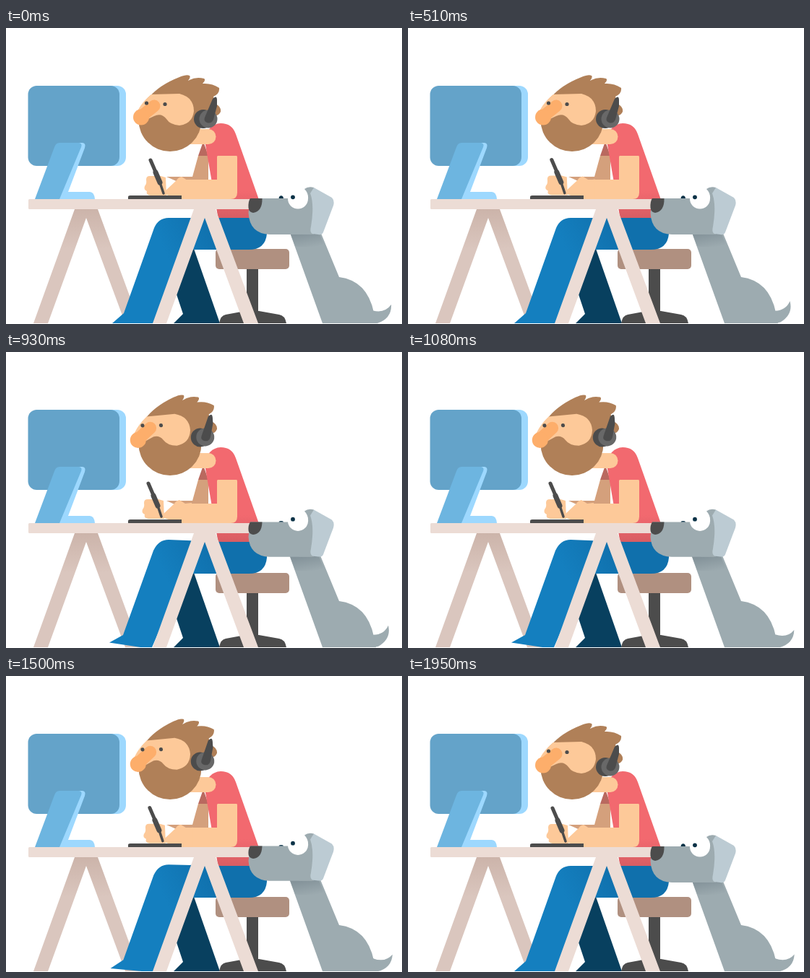
An HTML page for the animation above (1.98 s loop, 548 px wide and 410 px high).

```html
<!DOCTYPE html>
<html lang="en">
<head>
<meta charset="utf-8">
<title>At the desk</title>
<style>
  html, body { margin: 0; width: 100%; height: 100%; overflow: hidden; background: #fff; }
  svg { display: block; width: 548px; height: 410px; }
  .brown { fill: #b08058; } .skin { fill: #fdc999; } .dark { fill: #4c4c4c; }
  .wood { fill: #ecdcd5; } .glow { fill: #9dd8fe; } .navy { fill: #0b3247; }
  .dog { fill: #9dabb0; }
</style>
</head>
<body>
<svg viewBox="0 0 548 410">
  <defs>
    <linearGradient id="backWood" x1="0" y1="0" x2="0" y2="1">
      <stop offset="0" stop-color="#ccb4aa"/><stop offset=".35" stop-color="#dac6be"/>
    </linearGradient>
    <linearGradient id="jeans" gradientUnits="userSpaceOnUse" x1="215" y1="300" x2="285" y2="265">
      <stop offset="0" stop-color="#147fbf"/><stop offset="1" stop-color="#1070ac"/>
    </linearGradient>
    <linearGradient id="shirt" x1="0" y1="0" x2="0" y2="1">
      <stop offset=".7" stop-color="#f2696f"/><stop offset="1" stop-color="#d65c62"/>
    </linearGradient>
    <linearGradient id="neckShade" gradientUnits="userSpaceOnUse" x1="408" y1="284" x2="412" y2="306">
      <stop offset="0" stop-color="#84939a"/><stop offset="1" stop-color="#9dabb0"/>
    </linearGradient>
  </defs>

  <!-- far trestle, far leg, stool -->
  <path fill="url(#backWood)" d="M95 251H127L185 409H165L111 263L58 409H38Z"/>
  <path fill="#08405f" d="M232 409L245 396L228 345L258 300L296 409Z"/>
  <rect class="dark" x="333" y="330" width="16" height="66"/>
  <path class="dark" d="M295 409Q297 398 304 397L331 392H350L378 397Q386 398 388 409Z"/>
  <rect x="290" y="306" width="102" height="28" rx="5" fill="#b09080"/>

  <!-- body -->
  <path fill="#d4a07c" d="M266 177H280V214H240L222 206H258Z"/>
  <path fill="#b9695f" d="M273 157L266 177H280Z"/>
  <path fill="url(#shirt)" d="M275 156Q279 133 297 132Q313 132 318 147L360 266H294Z"/>
  <path class="skin" d="M255 140H280A10.5 10.5 0 0 1 280 161H255Z"/>
  <path id="leg" fill="url(#jeans)"/>

  <!-- arm, hands, pen -->
  <path class="skin" d="M293 177H319Q320 177 320 179V228Q320 237 311 237H240V210H292V178Z"/>
  <g id="hand">
    <path class="skin" d="M194 210Q194 205 199 205H214L221 207L222 232H200Q193 231 195 226Q190 224 192 219Q195 216 194 210Z"/>
    <path class="skin" d="M251 211L243 206Q238 207 236 211L220 226Q217 229 222 231L240 237H260V210Z"/>
    <g fill="none" stroke="#4c4c4c" stroke-linecap="round" stroke-linejoin="round">
      <path stroke-width="5" d="M200 183L206 197"/>
      <path stroke-width="7" d="M207 200L213 214"/>
      <path stroke-width="3.5" d="M213 214L218 229"/>
    </g>
  </g>
  <path class="dark" d="M169 237V234Q169 232 172 232H243V237Z"/>

  <!-- table -->
  <path class="wood" d="M260 251H290L349 409H329L275 263L222 409H203Z"/>
  <rect class="wood" x="31" y="237" width="311" height="14" rx="1.5"/>

  <!-- monitor -->
  <rect class="glow" x="60" y="80" width="106" height="111" rx="12"/>
  <rect x="30.500" y="80" width="126.500" height="111" rx="12" fill="#64a3c9"/>
  <path class="glow" d="M95 159H106Q111 160 109 166L86 227H116Q122 227 123 237H60Z"/>
  <path fill="#6db5e0" d="M74 159H101Q106 160 104 165L74 237H40L67 165Q69 159 74 159Z"/>

  <!-- head -->
  <circle class="brown" cx="227" cy="127.500" r="43.500"/>
  <g id="head">
    <path class="brown" d="M198 96Q212 79 240 68Q250 64 254 66Q256 68 252 73Q262 67 274 70Q277 72 272 77Q285 76 295 83Q296 91 287 95L290 105Q298 109 297 116Q294 123 286 121L268 140L200 112Z"/>
    <path class="skin" d="M201 92L240 91Q260 96 260 115Q258 133 240 135Q227 134 222 126Q215 117 205 122L184 132L183 113Q189 102 201 92Z"/>
    <path fill="none" stroke="#fdae6b" stroke-width="17" stroke-linecap="round" d="M205 108L189 121"/>
    <circle cx="187" cy="123.500" r="11" fill="#fdae6b"/>
    <circle class="dark" cx="194.500" cy="104" r="2.600"/>
    <circle class="dark" cx="220" cy="105.500" r="2.600"/>
    <circle class="dark" cx="273" cy="126" r="13"/>
    <circle cx="280" cy="126" r="12.500" fill="#686868"/>
    <path class="dark" d="M275 124L286 98Q292 92 292 100V108L287 127Q284 133 278 131Q273 129 275 124Z"/>
  </g>

  <!-- dog -->
  <path class="dog" id="tail" d="M500 409L506 391Q524 396 533 383Q534 402 514 409Z"/>
  <path class="dog" d="M388 270H430L461 345Q500 350 509 394L512 409H438Z"/>
  <path fill="url(#neckShade)" d="M393 283H433L440 300Q415 306 400 302Z"/>
  <path class="dog" id="snout"/>
  <path class="navy" id="farEye"/>
  <g id="dogHead">
    <path class="dog" d="M405 238H418Q419 229 413 223Q418 219 426 221V286H405Z"/>
    <circle cx="404" cy="236.500" r="14" fill="#fff"/>
    <circle class="navy" cx="397" cy="234.300" r="2.900"/>
    <path fill="#bccbd3" d="M426 221L451 235Q455 239 453 246L439 283Q437 287 432 286L424 285Q420 283 422 275Q427 245 421 229Z"/>
  </g>
  <path class="dark" id="nose"/>
  <rect y="409" width="548" height="1" fill="#fff"/>
</svg>
<script>
  const LOOP = 1980;
  const el = id => document.getElementById(id);
  const set = (id, name, value) => el(id).setAttribute(name, value);
  const ease = (t, from, to) => {
    const x = Math.min(1, Math.max(0, (t - from) / (to - from)));
    return x * x * (3 - 2 * x);
  };
  // Rises to 1 between a and b, falls back to 0 between c and d.
  const hold = (t, a, b, c, d) => ease(t, a, b) - ease(t, c, d);

  function draw(t) {
    const look = hold(t, 690, 920, 1700, 1940);
    const tap = hold(t, 690, 910, 1400, 1640);
    const write = hold(t, 400, 660, 1300, 1640);
    const wag = 9 * Math.cos((t - 1939) / 220 * 2 * Math.PI) - 3;

    set('head', 'transform', `rotate(${-4 * look} 162 183)`);
    set('hand', 'transform', `translate(${-3 * write} ${-write})`);
    set('tail', 'transform', `rotate(${wag} 508 402)`);
    set('dogHead', 'transform', `translate(0 ${-2.6 * look})`);

    const knee = 263 - 3 * tap;
    set('leg', 'd', `M225 ${knee}L300 263H361V285Q359 307 336 307H246L${207 - 5 * tap} 409
      H${190 - 4 * tap}L${147 - 4 * tap} ${409 - 6.5 * tap}L${163 - tap} ${395 - 3 * tap}
      L${205 - tap} ${277 - 2 * tap}Q211 ${knee} 225 ${knee}Z`);

    const top = 236 - .5 * look, chin = 286 - 2.2 * look;
    set('snout', 'd', `M338 ${top}H408V${chin}H365Q337 ${chin - 1} 335.500 256Z M407 ${top}H424V${chin}H407Z`);
    set('nose', 'd', `M338 ${top}H354.500Q${355 - look} ${254 - 2 * look} 342 ${256 - 3 * look}
      Q336 ${255 - 3 * look} 335.500 ${249 - 2 * look}Q335 240 338 ${top}Z`);
    const brow = 232.3 + 1.8 * look;
    set('farEye', 'd', `M377.500 ${top}Q378 ${brow} 380.800 ${brow}Q383.600 ${brow} 384 ${top}Z`);
  }

  const start = performance.now();
  function tick() {
    draw((performance.now() - start) % LOOP);
    requestAnimationFrame(tick);
  }
  tick();
</script>
</body>
</html>
```
